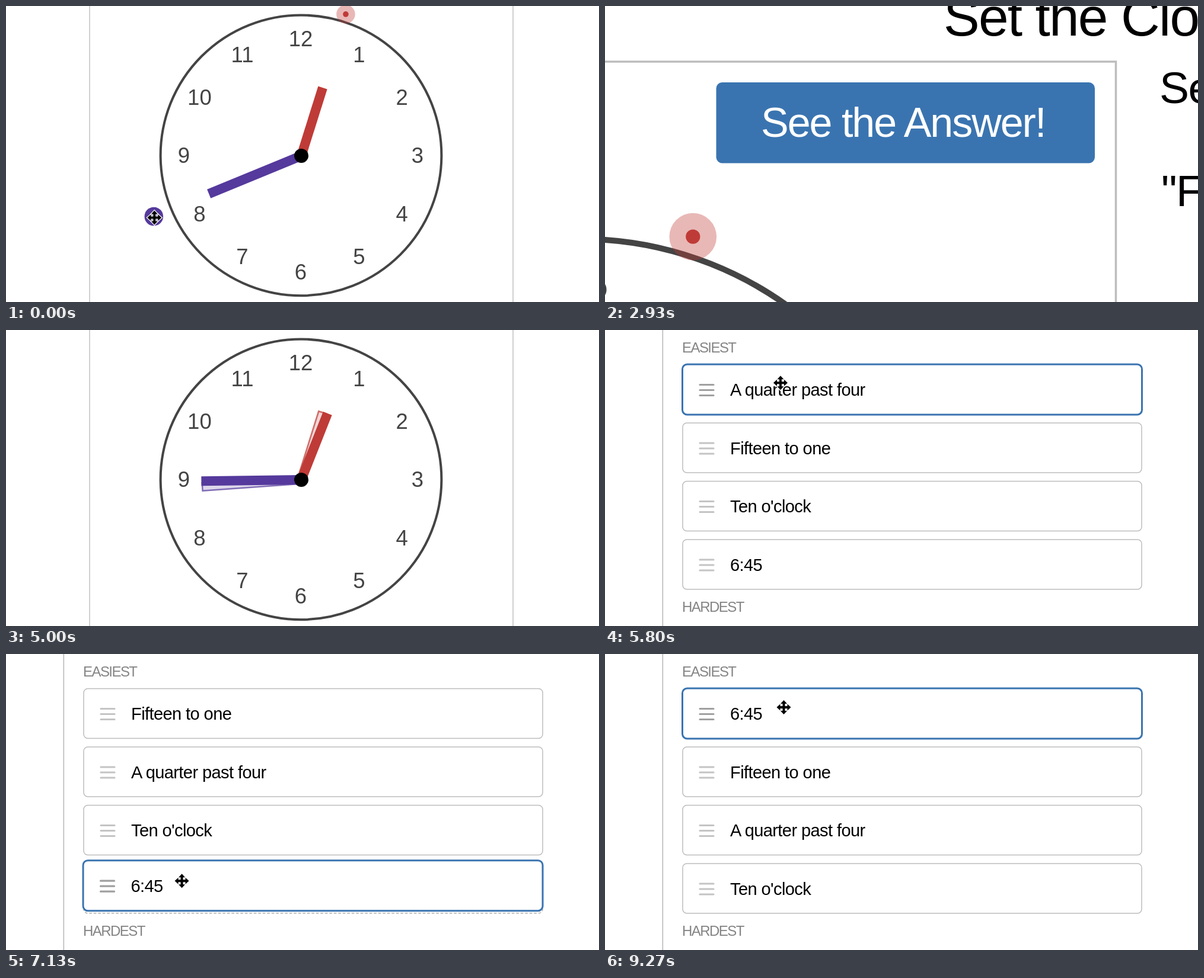
An HTML page for the animation above (9.6 s loop, 1000 px wide and 500 px high).

```html
<!DOCTYPE html>
<html>
<head>
<meta charset="utf-8">
<style>
html, body { margin: 0; width: 100%; height: 100%; overflow: hidden; background: #fff; }
svg { display: block; width: 1000px; height: 500px; font-family: "Liberation Sans", Arial, sans-serif; }
.tight { letter-spacing: -.02em; }
.button { letter-spacing: -.029em; fill: #fff; }
.caption { letter-spacing: -.065em; fill: #858585; }
</style>
</head>
<body>
<svg id="stage" viewBox="0 0 1000 500"></svg>
<script>
const LOOP = 9600, RED = '#bf3b37', PURPLE = '#55399c', BLUE = '#3a74b0', GREY = '#bdbdbd';
const stage = document.getElementById('stage');

const linear = (t, start, end) => Math.min(1, Math.max(0, (t - start) / (end - start)));
const ease = (t, start, end) => {
  const k = linear(t, start, end);
  return k * k * (3 - 2 * k);
};

const move = (x, y, body) => `<g transform="translate(${x} ${y})">${body}</g>`;
const text = (x, y, size, s, extra = 'class="tight"') => `<text x="${x}" y="${y}" font-size="${size}" ${extra}>${s}</text>`;
const disc = (x, y, r, extra = '') => `<circle cx="${x}" cy="${y}" r="${r}" ${extra}/>`;

// ---- cursors ----
const ARROWHEAD = [0, 90, 180, 270].map(a => `<path d="M-2 1V-6H-5.5L0-12 5.5-6H2V1Z" transform="rotate(${a})"/>`).join('');
const crossCursor = (x, y) => move(x, y, `<g stroke="#fff" stroke-width="2.5">${ARROWHEAD}</g>${ARROWHEAD}`);
const handCursor = (x, y) => move(x, y, `<path fill="#fff" stroke="#000" stroke-width="3.5" stroke-linejoin="round"
  d="M-6 4C-5-3 3-4 5 4L10 18C13 14 19 15 20 19C24 16 30 18 30 22C35 20 38 24 38 28L36 42 31 49 30 55H8L6 50-9 33C-19 24-17 19-10 20L-2 27Z"/>
  <path d="M10 30V43M17 30V43M24 30V43" stroke="#000" stroke-width="3"/>`);
const arrowCursor = (x, y) => move(x, y, `<path d="M0 0V44L10 35 17 51 24 48 17 32H31Z" stroke="#fff" stroke-width="3"/>`);

// ---- clock ----
const MID = [498, 253], HOUR = 17.4, START = 247.6, SET = 265.9;
const HOUR_LEN = 120.5, MINUTE_LEN = 168.6;

function polar(angle, r) {
  const a = angle * Math.PI / 180;
  return [MID[0] + r * Math.sin(a), MID[1] - r * Math.cos(a)];
}

function dial() {
  let s = disc(497.5, 252.3, 236.9, 'fill="none" stroke="#444" stroke-width="4"');
  for (let n = 1; n <= 12; n++) {
    const [x, y] = polar(n * 30, 197);
    s += text(x - 1, y + 12.3, 36.5, n, 'text-anchor="middle" fill="#444"');
  }
  return s;
}

const hand = (angle, len, color, inset = 0, style = '') => `<rect x="${inset - 8}" y="${inset - len}" width="${16 - 2 * inset}"
  height="${len}" fill="${color}" ${style} transform="translate(${MID}) rotate(${angle})"/>`;
const ghost = (angle, len, color) =>
  hand(angle, len, color, 1.3, `fill-opacity=".2" stroke="${color}" stroke-opacity=".7" stroke-width="2.6"`);
const idleKnob = (angle, color) => {
  const [x, y] = polar(angle, 250.6);
  return disc(x, y, 15.8, `fill="${color}" opacity=".36"`) + disc(x, y, 4.8, `fill="${color}"`);
};
const pin = disc(...MID, 12);
const sides = `<path d="M141 0V500M855 0V500" stroke="${GREY}" stroke-width="1.4"/>`;

// The minute hand is pulled down, then up past its first place.
function dragScene(t) {
  const down = ease(t, 50, 470), up = linear(t, 1200, 2150), away = ease(t, 2570, 2730);
  const low = START - 18.6 * down;
  const angle = low + (SET - low) * up;
  const [x, y] = polar(angle, 269 + 5 * down);
  return sides + dial() + idleKnob(HOUR, RED) + hand(HOUR, HOUR_LEN, RED) + hand(angle, MINUTE_LEN, PURPLE) + pin +
    (t < 2600 ? disc(x, y, 15.8, `fill="${PURPLE}"`) : idleKnob(angle, PURPLE)) +
    crossCursor(x + 1 - 13 * up + 90 * away, y + 2 - 22 * up - 112 * away);
}

function answerScene(t) {
  const k = linear(t, 4110, 5210);
  return sides + dial() + ghost(HOUR, HOUR_LEN, RED) + ghost(SET, MINUTE_LEN, PURPLE) +
    hand(HOUR + (22.5 - HOUR) * k, HOUR_LEN, RED) + hand(SET + (270 - SET) * k, MINUTE_LEN, PURPLE) + pin;
}

// ---- close-up of the button ----
function buttonScene(t) {
  const k = ease(t, 3130, 3530), x = 420 + 220 * k, y = 560 - 385 * k;
  const over = y < 265;
  return `<g transform="translate(-1295.5 354.7) scale(2.52)">${dial()}${idleKnob(HOUR, RED)}</g>
    <path d="M0 94H861.5V500" fill="none" stroke="${GREY}" stroke-width="3.5"/>
    <rect x="187.5" y="129" width="638.5" height="136.5" rx="10" fill="${over ? '#325d88' : BLUE}"/>` +
    text(263, 221, 70, 'See the Answer!', 'class="button"') +
    text(571, 50, 91, 'Set the Clock') +
    text(935, 164, 75, 'Set the') +
    text(938, 338, 75, '"Fifteen to one"') +
    (over ? handCursor(x, y) : arrowCursor(x, y));
}

// ---- sortable list ----
const LEFT = 131, TOP = 58.5, PITCH = 98.5, HEIGHT = 84;
const ITEMS = ['A quarter past four', 'Fifteen to one', "Ten o'clock", '6:45'];
const DRAGS = [
  { item: ITEMS[0], from: 0, to: 1, grab: 6050, land: 6465, drop: 6560 },
  { item: ITEMS[3], from: 3, to: 0, grab: 7090, land: 7640, drop: 8080 }];
const slotY = i => TOP + PITCH * i;

function card(label, x, y, active) {
  const box = active
    ? `<rect x="-.5" y="-.5" width="775" height="85" rx="8" fill="#fff" stroke="${BLUE}" stroke-width="3"/>`
    : `<rect width="774" height="${HEIGHT}" rx="7" fill="#fff" stroke="${GREY}" stroke-width="1.5"/>`;
  const grip = `<path d="M29 34H52M29 43H52M29 52H52" stroke="${active ? '#a0a0a0' : '#c4c4c4'}" stroke-width="3.2" stroke-linecap="round"/>`;
  return move(x, y, box + grip + text(80, 52.5, 29, label));
}

const placeholder = i => `<rect x="${LEFT}" y="${slotY(i)}" width="774" height="${HEIGHT}" rx="7" fill="#f8f8f8"
  stroke="#b4b4b4" stroke-width="1.5" stroke-dasharray="4.5 3"/>`;

function listScene(t) {
  const enter = 1 - ease(t, 5200, 5900), reach = ease(t, 6640, 6920), drift = ease(t, 8670, 9000);
  let cx = 294 + 36 * enter + 9.5 * reach + 11 * drift;
  let cy = 87 + 43 * enter + 204 * reach - drift;
  let order = ITEMS, held = '', hole = -1;
  for (const { item, from, to, grab, land, drop } of DRAGS) {
    if (t < grab) break;
    const slip = ease(t, grab, grab + 250);
    const dx = -6.5 * slip, dy = (to - from) * PITCH * ease(t, grab, land) - 1.5 * slip;
    let slot = to;
    if (t < drop) {
      hole = slot = Math.round(from + dy / PITCH);
      held = card(item, LEFT + dx, slotY(from) + dy, true);
    }
    order = order.filter(s => s !== item);
    order.splice(slot, 0, item);
    cx += dx;
    cy += dy;
  }
  const cards = order.map((label, i) => {
    const y = slotY(i);
    return i === hole ? placeholder(i) : card(label, LEFT, y, !held && cy > y && cy < y + HEIGHT);
  });
  return `<path d="M97.3 0V500" stroke="${GREY}" stroke-width="1.7"/>` +
    text(130, 38, 24, 'EASIEST', 'class="caption"') + text(130, 476, 24, 'HARDEST', 'class="caption"') +
    cards.join('') + held + crossCursor(cx, cy);
}

function frame() {
  const t = performance.now() % LOOP;
  const scene = t < 2930 ? dragScene : t < 4070 ? buttonScene : t < 5130 ? answerScene : listScene;
  stage.innerHTML = scene(t);
  requestAnimationFrame(frame);
}
frame();
</script>
</body>
</html>
```
